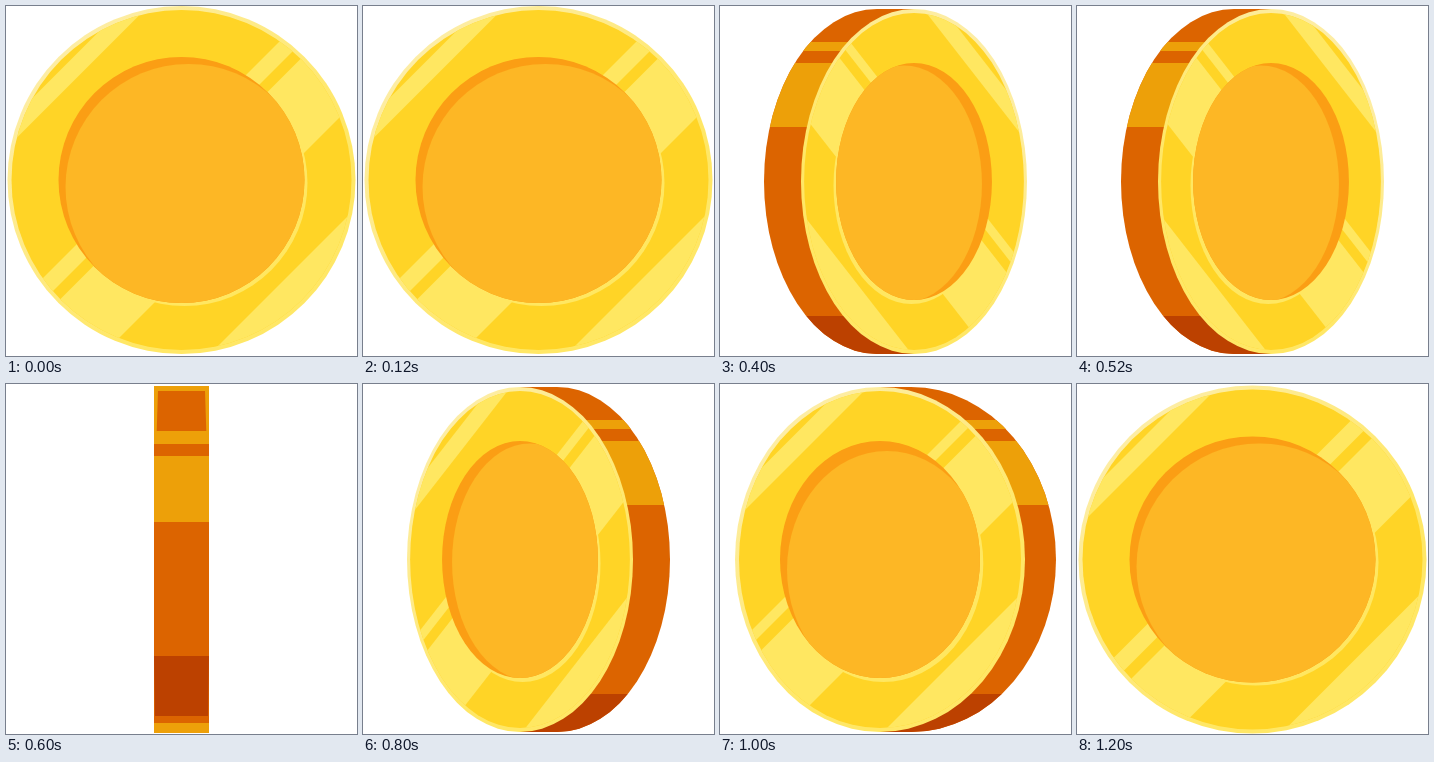
Recreate the animation shown at these times as an HTML page with a canvas. Size 351 by 350 pixels, loop 1400 ms.

```html
<!DOCTYPE html>
<html lang="en">
<head>
<meta charset="utf-8">
<title>Spinning coin</title>
<style>
html, body { margin: 0; width: 100%; height: 100%; overflow: hidden; background: #fff; }
canvas { display: block; }
</style>
</head>
<body>
<canvas id="stage" width="351" height="350"></canvas>
<script>
const ctx = document.getElementById('stage').getContext('2d');
const ORANGE = '#dc6400', AMBER = '#eda009', RUST = '#bc4100';
const GOLD = '#ffd426', SHINE = '#ffe761';
const STEP = 200;

// shine: diagonal bands as pairs of offsets from the centre
const FRONT = {
  rx: 174, ry: 174, hole: [123, 123], lip: [-3, 3],
  shine: [[-231, -207], [-40.5, -17.5], [-2, 95.5], [202.5, 400]]
};
const TURNED = {
  rx: 145, ry: 172.5, hole: [100, 118.5], lip: [-3.3, 4],
  shine: [[-210, -184.5], [-57.5, -43.5], [-28, 75.5], [175.5, 400]]
};

function oval(x, y, rx, ry) {
  ctx.beginPath();
  ctx.ellipse(x, y, rx, ry, 0, 0, Math.PI * 2);
}

function fillOval(x, y, rx, ry, color) {
  oval(x, y, rx, ry);
  ctx.fillStyle = color;
  ctx.fill();
}

function poly(points, color) {
  ctx.beginPath();
  points.forEach(p => ctx.lineTo(...p));
  ctx.fillStyle = color;
  ctx.fill();
}

function bar(x, w, top, bottom, color) {
  ctx.fillStyle = color;
  ctx.fillRect(x, top, w, bottom - top);
}

function clipped(draw) {
  ctx.save();
  ctx.clip();
  draw();
  ctx.restore();
}

function face(look, x, y, scale, shadow) {
  const { rx, ry, hole, lip, shine } = look;
  ctx.save();
  ctx.translate(x, y);
  ctx.scale(scale, 1);

  const rim = ctx.createLinearGradient(rx * 0.7, -ry * 0.7, -rx * 0.3, ry * 0.3);
  rim.addColorStop(0, '#fdeda4');
  rim.addColorStop(1, '#ffe766');
  fillOval(0, 0, rx, ry, rim);

  oval(0, 0, rx - 4, ry - 4);
  clipped(() => {
    bar(-rx, 2 * rx, -ry, ry, GOLD);
    for (const [a, b] of shine)
      poly([[-200, a - 200], [200, a + 200], [200, b + 200], [-200, b - 200]], SHINE);
  });

  fillOval(...lip, ...hole, SHINE);
  fillOval(0, 0, ...hole, '#fb9e14');
  oval(0, 0, ...hole);
  clipped(() => fillOval(...shadow, ...hole, '#fdb725'));
  ctx.restore();
}

function turned(x, back, rx, shadow) {
  const y = 175.5, ry = TURNED.ry;
  ctx.beginPath();
  ctx.ellipse(back, y, rx, ry, 0, Math.PI / 2, Math.PI * 1.5);
  ctx.lineTo(x, y - ry);
  ctx.lineTo(x, y + ry);
  clipped(() => {
    bar(0, x, 0, 350, ORANGE);
    bar(0, x, 36, 45, AMBER);
    bar(0, x, 57, 121, AMBER);
    bar(0, x, 310, 350, RUST);
  });
  face(TURNED, x, y, rx / TURNED.rx, shadow);
}

function edge() {
  bar(148, 55, 2, 349, AMBER);
  poly([[152, 7], [199, 7], [200.3, 47], [150.7, 47]], ORANGE);
  bar(148, 55, 60, 72, ORANGE);
  bar(148, 55, 138, 339, ORANGE);
  poly([[148, 272], [203, 272], [202, 332], [149, 332]], RUST);
}

function mirrored(draw) {
  ctx.save();
  ctx.translate(351, 0);
  ctx.scale(-1, 1);
  draw();
  ctx.restore();
}

const front = y => face(FRONT, 175.5, y, -1, [-7, 7]);
const tilted = () => turned(191, 160, 145, [-7, 10]);
const steep = () => turned(194, 157, 113, [-12.8, 2.5]);

const poses = [
  () => front(174),
  tilted,
  steep,
  edge,
  () => mirrored(steep),
  () => mirrored(tilted),
  () => front(175.5)
];

const start = performance.now();

function tick() {
  const elapsed = performance.now() - start;
  ctx.fillStyle = '#fff';
  ctx.fillRect(0, 0, 351, 350);
  poses[Math.floor(elapsed / STEP) % poses.length]();
  requestAnimationFrame(tick);
}

tick();
</script>
</body>
</html>
```
